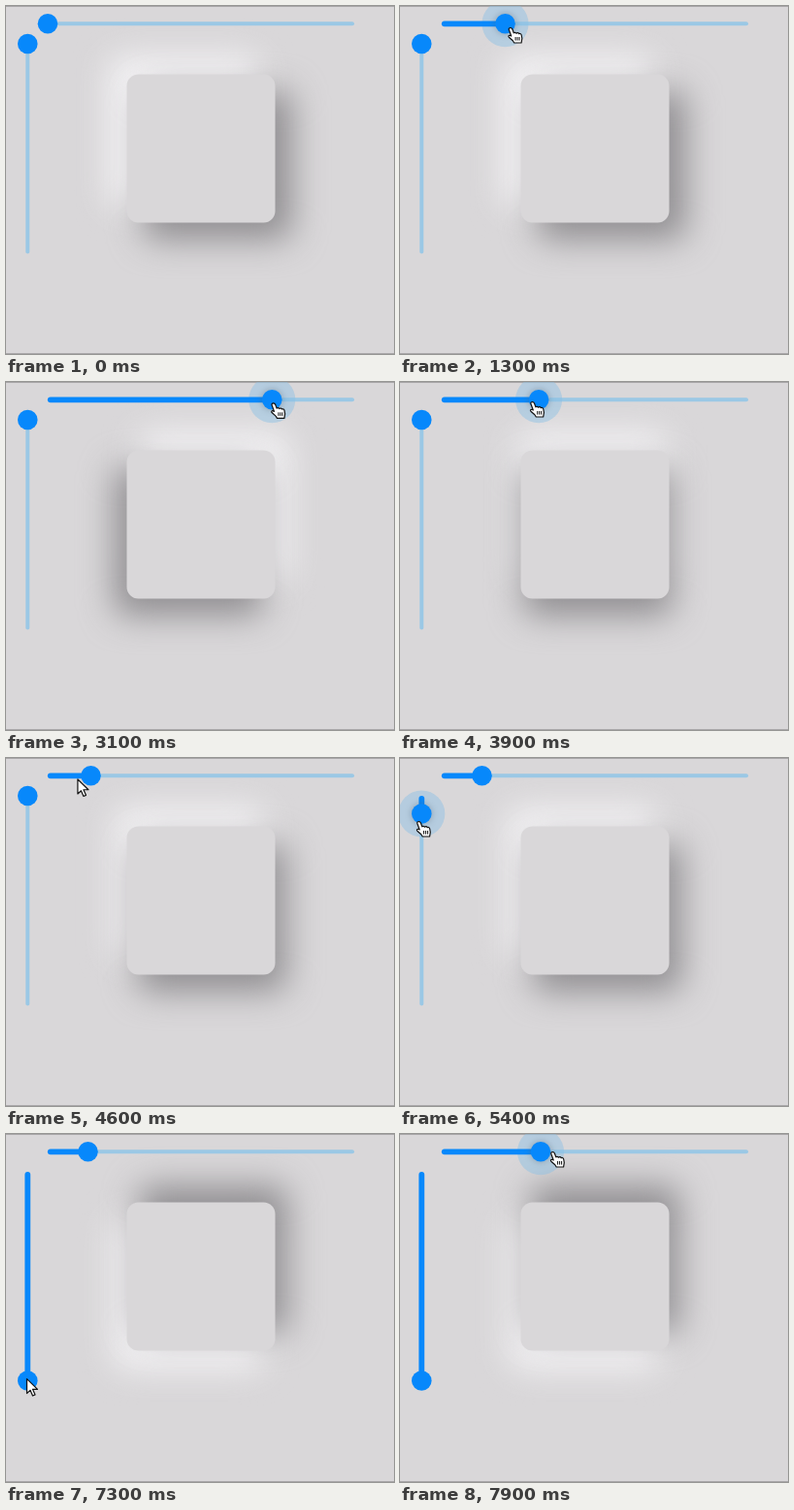
An HTML page that plays this animation: 400 by 359 pixels, repeating every 8000 ms.

```html
<!DOCTYPE html>
<html lang="en">
<head>
<meta charset="utf-8">
<title>Soft shadow sliders</title>
<style>
  html, body { margin: 0; width: 100%; height: 100%; overflow: hidden; background: #d9d7d9; }
  svg { display: block; width: 400px; height: 359px; }
  .soft { filter: blur(17.5px); }
  .track { stroke: #9bc8e5; stroke-width: 4; stroke-linecap: round; }
  .fill { stroke: #0788fb; stroke-width: 5.8; stroke-linecap: round; }
  .thumb { fill: #0788fb; }
  .halo { fill: #87bfe5; opacity: .45; }
  .glow { fill: #506070; opacity: .35; filter: blur(3px); }
  .cursor { stroke: #111; stroke-width: 1.2; fill: #fff; stroke-linejoin: round; }
</style>
</head>
<body>
<svg viewBox="0 0 400 359">
  <defs><rect id="card" x="124.5" y="70.5" width="153" height="153" rx="12"/></defs>
  <rect width="400" height="359" fill="#d9d7d9"/>
  <use id="light" class="soft" href="#card" fill="#f7f6f8"/>
  <use id="dark" class="soft" href="#card" fill="#8f8d90"/>
  <use href="#card" fill="#d9d7d9"/>
  <path d="M0 .5H400M0 358.5H400" stroke="#aaa8aa"/>
  <g id="across"></g>
  <g id="down"></g>
  <path id="arrow" class="cursor" d="M0 0V15L3.5 11.8L6 17.5L8.5 16.4L6 10.8H11Z"/>
  <g id="hand" class="cursor">
    <path d="M1.5 .8C2.8 .2 4 .9 4.5 2.2L5.8 5.8C6.6 5 8 5.2 8.4 6.2C9.4 5.3 10.8 5.6 11.2 6.7C12.4 6.1 13.5 6.8 13.7 8L14.3 11.5L13.6 16H6.2L4.8 13.8L.8 10.2C-.2 9 .9 8 2.2 8.5L3.2 9L1 3C.5 2 .6 1.2 1.5 .8Z"/>
    <path d="M7.6 10V13.6M9.6 10V13.6M11.6 10V13.6" stroke-width="1"/>
  </g>
</svg>
<script>
const LOOP = 8000, STEP = 100, LAG = 220, REACH = 17;
const H = { start: 43, end: 358, fixed: 18.3 };
const V = { start: 39, end: 254.5, fixed: 22.3 };

const $ = id => document.getElementById(id);
const within = (t, a, b) => t >= a && t < b;
const progress = (t, a, b) => Math.min(1, Math.max(0, (t - a) / (b - a)));
const settle = (t, a, b) => Math.sin(progress(t, a, b) * Math.PI / 2);
const glide = (t, a, b) => {
  const u = progress(t, a, b);
  return u * u * (3 - 2 * u);
};
const mix = (a, b, u) => a + (b - a) * u;
const mixPoint = (p, q, u) => [mix(p[0], q[0], u), mix(p[1], q[1], u)];

// Horizontal drags: full right, back near the start, then a short pull right
function acrossAt(t) {
  const rest = 84.5;
  let x = mix(H.start, H.end, settle(t, 1100, 2600));
  x = mix(x, rest, settle(t, 2680, 4800));
  return mix(x, 145, glide(t, 7550, 7900));
}

const downAt = t => mix(V.start, V.end, glide(t, 5180, 6400));

// The pointer glides to each grip and then rides along with the thumb
function pointerAt(t) {
  const x = acrossAt(t), y = downAt(t);
  const lean = glide(t, 2600, 3900);
  let p = [324, 78];
  p = mixPoint(p, [x + 3 - 12 * lean, 22 - 2 * lean], glide(t, 100, 900));
  p = mixPoint(p, [17, y + 7.5], glide(t, 4500, 5100));
  p = mixPoint(p, [8, 296], glide(t, 6450, 6800));
  return mixPoint(p, [x + 10, 18], glide(t, 7200, 7600));
}

function set(el, attrs) {
  for (const name in attrs) el.setAttribute(name, attrs[name]);
}

function add(parent, tag, cls, attrs) {
  const el = document.createElementNS('http://www.w3.org/2000/svg', tag);
  el.setAttribute('class', cls);
  set(el, attrs);
  return parent.appendChild(el);
}

function show(el, on) {
  el.style.display = on ? '' : 'none';
}

function move(el, x, y) {
  set(el, { transform: `translate(${x} ${y})` });
}

function makeSlider(group, range, vertical) {
  const line = (a, b) => vertical
    ? { x1: range.fixed, x2: range.fixed, y1: a, y2: b }
    : { x1: a, x2: b, y1: range.fixed, y2: range.fixed };
  const centre = p => vertical ? { cx: range.fixed, cy: p } : { cx: p, cy: range.fixed };
  const capped = range.start + 2.8;
  add(group, 'line', 'track', line(capped, range.end - 1));
  const halo = add(group, 'circle', 'halo', { r: 24 });
  const fill = add(group, 'line', 'fill', {});
  const glow = add(group, 'circle', 'glow', { r: 11 });
  const thumb = add(group, 'circle', 'thumb', { r: 10.3 });
  return (pos, active) => {
    set(fill, line(capped, pos));
    for (const el of [halo, glow, thumb]) set(el, centre(pos));
    show(fill, pos > capped);
    show(halo, active);
    show(glow, active);
  };
}

const drawAcross = makeSlider($('across'), H, false);
const drawDown = makeSlider($('down'), V, true);

// Slider position mapped to an offset from +REACH to -REACH
const offset = (pos, range) => mix(REACH, -REACH, progress(pos, range.start, range.end));

function draw(t) {
  const onAcross = within(t, 800, 4600) || t >= 7500;
  const onDown = within(t, 4900, 6500);
  drawAcross(acrossAt(t), onAcross);
  drawDown(downAt(t), onDown);

  const dx = offset(acrossAt(t - LAG), H);
  const dy = offset(downAt(t - LAG), V);
  move($('dark'), dx, dy);
  move($('light'), -dx, -dy);

  const overSlider = onAcross || onDown;
  for (const id of ['hand', 'arrow']) move($(id), ...pointerAt(t));
  show($('hand'), overSlider);
  show($('arrow'), t >= 100 && !overSlider);
}

const begin = performance.now();
function tick() {
  const t = (performance.now() - begin) % LOOP;
  draw(Math.floor(t / STEP) * STEP);
  requestAnimationFrame(tick);
}
tick();
</script>
</body>
</html>
```
